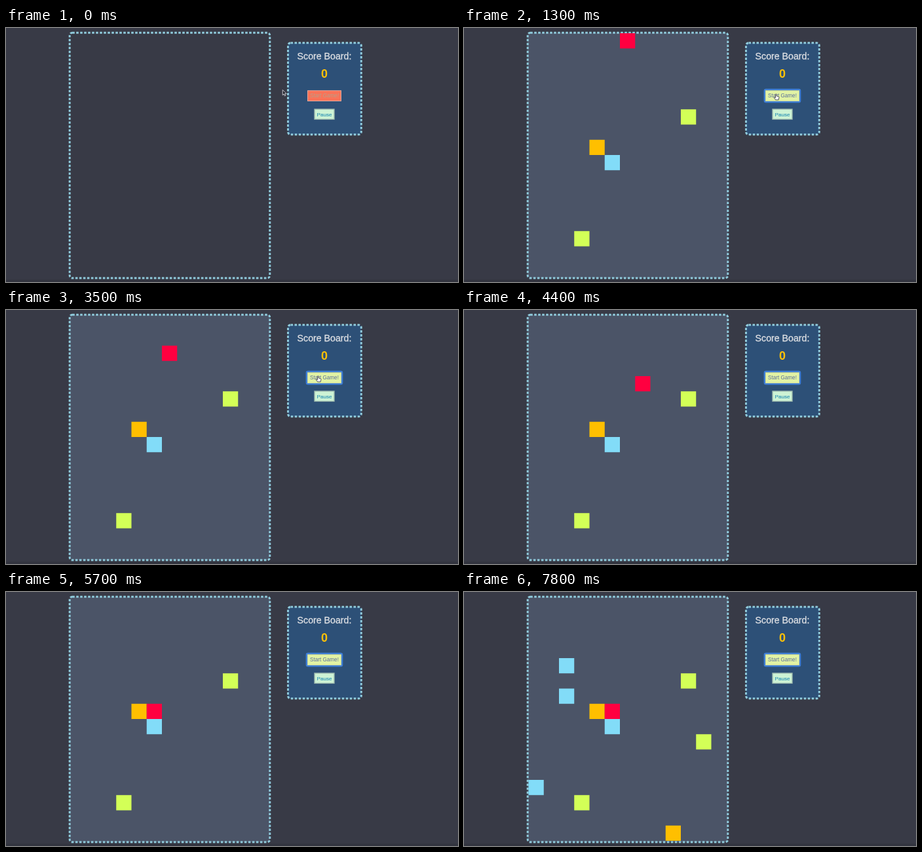
These frames come from a looping animation (690x388 px, 8 s). An HTML page:

```html
<!DOCTYPE html>
<html lang="en">
<head>
<meta charset="utf-8">
<style>
  html, body { margin: 0; width: 100%; height: 100%; overflow: hidden; background: #383a46; }
  svg { display: block; width: 690px; height: 388px; }
  text { font-family: "Liberation Sans", Arial, sans-serif; text-anchor: middle; }
  .dots { stroke: #8fcadb; stroke-width: 3; stroke-dasharray: 3.6 2.4; }
  .pointer { fill: #20212b; stroke: #e8e8ee; stroke-width: .8; stroke-linejoin: round; }
  #start rect { fill: #fa7358; stroke: #e3a79c; }
  #start text { fill: #b3a18b; font-style: italic; }
  #start.hover rect { fill: #e2f3a4; stroke: #c9d6a0; }
  #start.hover text { fill: #596f9c; font-style: normal; }
</style>
</head>
<body>
<svg viewBox="0 0 690 388">
  <rect y="384.5" width="690" height="3.5" fill="#32343f"/>
  <rect id="board" class="dots" x="97.2" y="7.2" width="305.6" height="374.8" rx="4"/>
  <g id="cells"></g>

  <rect class="dots" x="430.5" y="22.8" width="111.8" height="140" rx="4" fill="#2d5077"/>
  <text x="486" y="48.3" font-size="14.2" fill="#dddfe3" stroke="#dddfe3" stroke-width=".3">Score Board:</text>
  <text x="486" y="75.5" font-size="18" font-weight="bold" fill="#ffc107">0</text>

  <rect id="ring" x="458.9" y="94" width="54.2" height="19" rx="2" fill="none" stroke="#3f7fd6" stroke-width="2.4"/>
  <g id="start" font-size="8.15">
    <rect x="460.5" y="95.7" width="51" height="15.8"/>
    <text x="486" y="106.4">Start Game!</text>
  </g>
  <g font-size="8.1">
    <rect x="471" y="124" width="30" height="15.4" fill="#cdf3d5" stroke="#9db9ae" stroke-width="1.4"/>
    <text x="486" y="134.7" fill="#2a91b4" stroke="#2a91b4" stroke-width=".15">Pause</text>
  </g>

  <path id="arrow" class="pointer" d="M0 0V8L1.9 6.3 3.1 9.2 4.5 8.6 3.3 5.8H5.7Z"/>
  <path id="hand" class="pointer" style="fill:#f4f4f4;stroke:#30313d"
    d="M-.8 .7Q0-.5 .8 .7V3.4L3.8 4.1Q4.8 4.6 4.6 6L3.8 9.3H-.6L-3.2 5.8Q-2.6 4.7-.8 6Z"/>
</svg>
<script>
const LOOP = 8000, CELL = 23.25, LEFT = 98.5, TOP = 8;
const RED = '#ff0040', LIME = '#d3ff57', AMBER = '#ffbf00', SKY = '#82dcf8';
const START = 1300, SPAWN = 6000;

// Settled blocks: column, row, colour, time of appearance
const settled = [
  [10, 5, LIME, START], [4, 7, AMBER, START], [5, 8, SKY, START], [3, 13, LIME, START],
  [2, 6, SKY, SPAWN], [11, 9, LIME, SPAWN], [0, 12, SKY, SPAWN], [9, 15, AMBER, SPAWN]
];
// Falling blocks: time, column, row of each step
const falling = [
  { color: RED, steps: [
    [START, 6, 0], [2050, 6, 1], [2800, 6, 2], [3550, 6, 3], [4100, 7, 3], [4400, 7, 4],
    [4600, 6, 4], [4900, 5, 4], [5100, 5, 5], [5400, 5, 6], [5700, 5, 7]] },
  { color: SKY, steps: [
    [SPAWN, 6, 1], [6700, 5, 2], [6900, 4, 2], [7100, 3, 2], [7400, 2, 2], [7600, 2, 3], [7800, 2, 4]] }
];

const $ = id => document.getElementById(id);
const show = (id, on) => $(id).style.display = on ? '' : 'none';
const cell = (col, row, color) =>
  `<rect x="${LEFT + col * CELL}" y="${TOP + row * CELL}" width="${CELL}" height="${CELL}" fill="${color}"/>`;

function drawCells(t) {
  let out = settled.filter(s => t >= s[3]).map(s => cell(...s)).join('');
  for (const { color, steps } of falling) {
    const step = steps.filter(s => t >= s[0]).pop();
    if (step) out += cell(step[1], step[2], color);
  }
  $('cells').innerHTML = out;
}

function drawPointer(t) {
  const p = Math.min(1, Math.max(0, (t - 50) / 550));
  const k = p * p * (3 - 2 * p);
  const x = 422.3 + 54 * k, y = 94.5 + 6 * k;
  const hover = x > 460, visible = t < 4100;
  $('start').classList.toggle('hover', hover);
  for (const id of ['arrow', 'hand']) {
    show(id, visible && hover === (id === 'hand'));
    $(id).setAttribute('transform', `translate(${x} ${y})`);
  }
}

function frame() {
  const t = performance.now() % LOOP;
  $('board').setAttribute('fill', t < START ? 'none' : '#4b5467');
  show('ring', t >= 1000);
  drawCells(t);
  drawPointer(t);
  requestAnimationFrame(frame);
}
frame();
</script>
</body>
</html>
```
